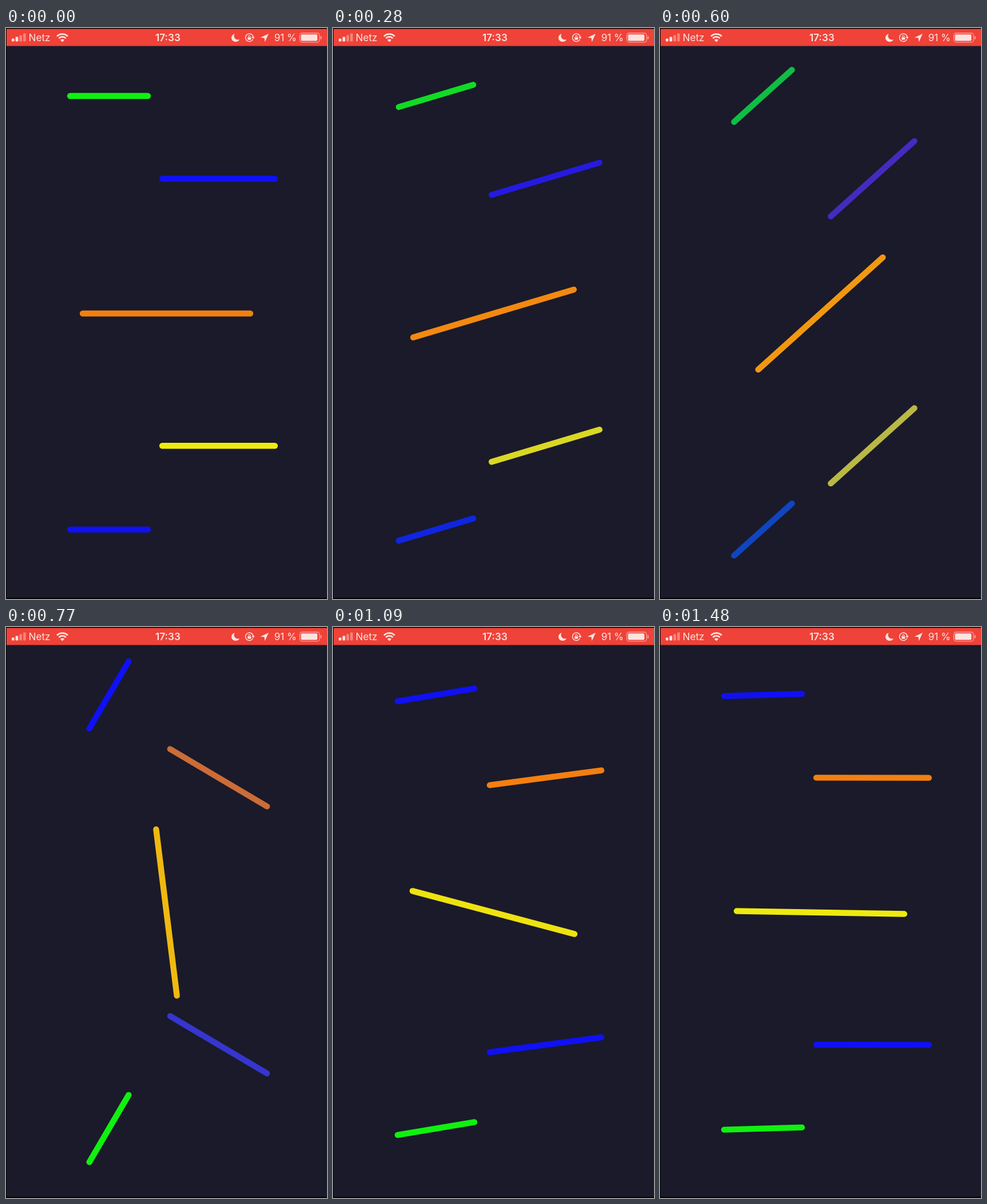
Recreate the animation shown at these times as an HTML page with a canvas. Size 561x998 px, loop 1.6 s.

```html
<!DOCTYPE html>
<html lang="en">
<head>
<meta charset="utf-8">
<title>Springing bars</title>
<style>
  html, body { margin: 0; width: 100%; height: 100%; overflow: hidden; background: #000; }
  canvas { display: block; width: 561px; height: 998px; }
</style>
</head>
<body>
<canvas id="stage" width="561" height="998"></canvas>
<script>
const ctx = document.getElementById('stage').getContext('2d');
const LOOP = 1600;
const RELEASE = 0.635, RELEASE_ANGLE = 45;

// When each pose appears (ms) and the moment of the motion it shows (s).
const poses = [
  [0, 0], [100, .1], [190, .2], [280, .3], [380, .4], [500, .5], [600, .6], [700, .69],
  [770, .8], [890, .9], [990, 1], [1090, 1.1], [1210, 1.2], [1310, 1.3], [1410, 1.4], [1480, 1.5]
];
const dragAngles = [0, 4, 10, 16.6, 23, 30.3, 42];

const GREEN = [16, 241, 16], BLUE = [16, 16, 245], ORANGE = [243, 127, 16], YELLOW = [238, 235, 16];
const bouncy = { decay: 4.95, freq: 19.04 };
const soft = { decay: 5.8, freq: 9.6 };
const critical = { decay: 8.1, freq: 0.01 };

const bars = [
  { x: 180, y: 118.7, half: 68, spring: bouncy, from: GREEN, to: BLUE },
  { x: 371.5, y: 263.5, half: 98.4, spring: soft, from: BLUE, to: ORANGE },
  { x: 280.5, y: 499, half: 146.5, spring: critical, from: ORANGE, to: YELLOW },
  { x: 371.5, y: 730.2, half: 98.4, spring: soft, from: YELLOW, to: BLUE },
  { x: 180, y: 876.6, half: 68, spring: bouncy, from: BLUE, to: GREEN }
];

// Dragged by hand first, then a damped spring towards half a turn.
function angleAt(time, { decay, freq }) {
  if (time < RELEASE) return dragAngles[Math.round(time * 10)];
  const t = time - RELEASE;
  const swing = Math.cos(freq * t) + decay / freq * Math.sin(freq * t);
  return 180 - (180 - RELEASE_ANGLE) * Math.exp(-decay * t) * swing;
}

function mix(a, b, p) {
  return `rgb(${a.map((v, i) => Math.round(v + (b[i] - v) * p)).join(',')})`;
}

function drawBar(bar, time) {
  const angle = angleAt(time, bar.spring);
  const rad = angle * Math.PI / 180;
  const dx = bar.half * Math.cos(rad), dy = -bar.half * Math.sin(rad);
  ctx.strokeStyle = mix(bar.from, bar.to, Math.min(1, angle / 180));
  ctx.lineWidth = 10.4;
  ctx.lineCap = 'round';
  ctx.beginPath();
  ctx.moveTo(bar.x - dx, bar.y - dy);
  ctx.lineTo(bar.x + dx, bar.y + dy);
  ctx.stroke();
}

function roundRect(x, y, w, h, r) {
  ctx.beginPath();
  ctx.roundRect(x, y, w, h, r);
}

function polygon(...points) {
  ctx.beginPath();
  points.forEach(([x, y]) => ctx.lineTo(x, y));
  ctx.closePath();
  ctx.fill();
}

function arc(x, y, r, from, to, width) {
  ctx.lineWidth = width;
  ctx.beginPath();
  ctx.arc(x, y, r, from, to);
  ctx.stroke();
}

function label(text, x, weight, size, align) {
  ctx.font = `${weight} ${size}px Inter, sans-serif`;
  ctx.textAlign = align;
  ctx.fillText(text, x, 23);
}

function drawStatusBar() {
  const light = '#fce3e0', dim = '#f4857d';
  ctx.fillStyle = '#ef4238';
  ctx.fillRect(1, 1.5, 560, 30);
  ctx.lineCap = 'butt';

  [5, 8, 11, 14].forEach((h, i) => {
    ctx.fillStyle = i < 2 ? light : dim;
    roundRect(10 + i * 6.7, 23.5 - h, 4.6, h, 1);
    ctx.fill();
  });

  ctx.fillStyle = ctx.strokeStyle = light;
  label('Netz', 39.5, 400, 17.2, 'left');
  label('17:33', 283, 600, 17.2, 'center');
  label('91 %', 508, 400, 17.2, 'right');

  // Wi-Fi
  const a = -Math.PI * .75, b = -Math.PI * .25;
  arc(98.5, 24, 13.3, a, b, 2.8);
  arc(98.5, 24, 8.6, a, b, 2.8);
  ctx.beginPath();
  ctx.moveTo(98.5, 24.5);
  ctx.arc(98.5, 24.5, 5, a, b);
  ctx.fill();

  // Moon
  ctx.beginPath();
  ctx.moveTo(399.5, 10);
  ctx.bezierCurveTo(391, 13, 393, 24, 401.5, 24);
  ctx.bezierCurveTo(404.5, 24, 407, 22.5, 408, 20);
  ctx.bezierCurveTo(401, 22, 396.5, 16, 399.5, 10);
  ctx.fill();

  // Rotation lock
  arc(425.3, 16.8, 6.8, .45, Math.PI * 2 - .1, 1.5);
  polygon([429.2, 15.8], [434.6, 15.8], [432, 19.2]);
  ctx.fillRect(422.3, 16.2, 6, 4.4);
  arc(425.3, 15.6, 2, Math.PI, 0, 1.2);

  // Location
  polygon([459, 10], [444.8, 16.8], [451.6, 17.4], [452.4, 24.4]);

  // Battery
  ctx.strokeStyle = '#f6a39d';
  ctx.lineWidth = 1.3;
  roundRect(513.5, 9, 34.5, 15.8, 4);
  ctx.stroke();
  roundRect(515.6, 11.2, 28.6, 11.4, 2);
  ctx.fill();
  ctx.fillStyle = '#f6a39d';
  roundRect(549.6, 14.3, 2, 5.4, 1);
  ctx.fill();
}

function render(ms) {
  const now = ms % LOOP;
  const [, time] = poses.findLast(([start]) => start <= now);
  ctx.fillStyle = '#000';
  ctx.fillRect(0, 0, 561, 998);
  ctx.fillStyle = '#1a1a2a';
  ctx.fillRect(1, 31, 560, 965);
  drawStatusBar();
  bars.forEach(bar => drawBar(bar, time));
}

let origin;
function tick(stamp) {
  origin ??= stamp;
  render(Math.max(0, stamp - origin));
  requestAnimationFrame(tick);
}
render(0);
requestAnimationFrame(tick);
</script>
</body>
</html>
```
